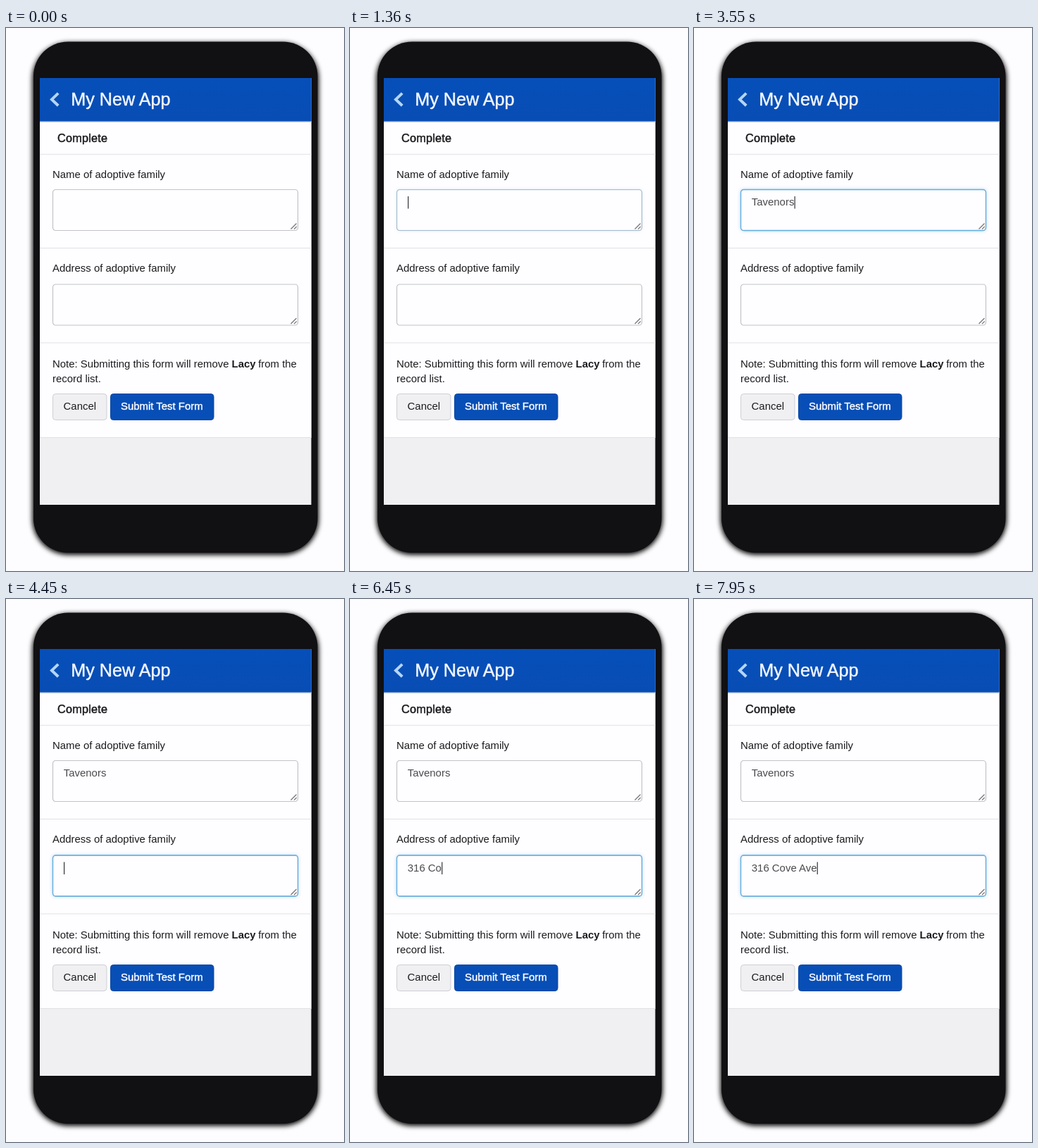
Animation, 480 px wide and 771 px high, one loop 8000 ms. Source, as an HTML page:

```html
<!DOCTYPE html>
<html lang="en">
<head>
<meta charset="utf-8">
<title>Adoption form</title>
<style>
html, body { margin: 0; width: 100%; height: 100%; overflow: hidden; background: #fdfcfe; }
svg { display: block; width: 100%; height: 100%; }
text { font: 14.93px "Liberation Sans", Arial, sans-serif; fill: #1c1c1e; white-space: pre; }
.title { font-size: 25.2px; fill: #f4f8ff; stroke: #f4f8ff; stroke-width: .45; }
.heading { font-size: 16.2px; letter-spacing: .25px; stroke: #1c1c1e; stroke-width: .5; }
.bold { font-weight: bold; }
.submit { fill: #fff; stroke: #fff; stroke-width: .4; }
.value { fill: #4b4b4e; }
.rule { stroke: #e1e1e5; }
.edge { fill: #fefdff; stroke: #c3c3c8; stroke-width: 1.2; }
.ring { fill: none; stroke: #62aee0; stroke-width: 1.3; }
.glow { fill: #66afe9; filter: url(#soft); }
.grip { fill: none; stroke: #6f6f73; stroke-width: 1.1; }
.caret { fill: #333336; }
</style>
</head>
<body>
<svg viewBox="0 0 480 771" preserveAspectRatio="none">
  <defs>
    <filter id="shade" x="-10%" y="-10%" width="120%" height="120%"><feGaussianBlur stdDeviation="3.6"/></filter>
    <filter id="soft" x="-5%" y="-25%" width="110%" height="150%"><feGaussianBlur stdDeviation="2.6"/></filter>
    <linearGradient id="bar" x1="0" y1="0" x2="0" y2="1">
      <stop offset="0" stop-color="#064fb9"/><stop offset="1" stop-color="#084db4"/>
    </linearGradient>
  </defs>

  <rect width="480" height="771" fill="#fdfcfe"/>
  <rect x="37.5" y="21" width="406.5" height="727" rx="51" fill="#000" filter="url(#shade)"/>
  <rect x="39" y="19.5" width="403.5" height="725.5" rx="49" fill="#111013"/>

  <rect x="48" y="71" width="385.5" height="606" fill="#f0eff2"/>
  <rect x="48" y="132" width="385.5" height="449.5" fill="#fefdff"/>
  <rect x="48" y="132" width="385.5" height="2" fill="#c9d2e4"/>
  <rect x="48" y="71" width="385.5" height="61.5" fill="url(#bar)"/>
  <path d="M74.2 92.6 65 101.4 74.2 110.2" fill="none" stroke="#b4d5f6" stroke-width="4"/>
  <text class="title" x="92.2" y="110.3">My New App</text>
  <text class="heading" x="73" y="161.5">Complete</text>
  <path class="rule" d="M48 179.3H433.5M48 312.5H433.5M48 447H433.5M48 581.5H433.5"/>

  <text x="66" y="213">Name of adoptive family</text>
  <text x="66" y="346.3">Address of adoptive family</text>
  <g id="fields"></g>

  <text x="66" y="482.3">Note: Submitting this form will remove</text>
  <text class="bold" x="320.6" y="482.3">Lacy</text>
  <text x="358.2" y="482.3">from the</text>
  <text x="66" y="503">record list.</text>
  <rect x="66.5" y="519.5" width="76.5" height="37" rx="4" fill="#f0eff2" stroke="#cfcfd3"/>
  <text x="81.6" y="542.3">Cancel</text>
  <rect x="148.5" y="519.5" width="146.5" height="37" rx="4" fill="#074eb6" stroke="#0646a5"/>
  <text class="submit" x="163" y="542.3">Submit Test Form</text>
</svg>
<script>
const LOOP = 8000, FADE = 150, BLINK = 500;
const NS = "http://www.w3.org/2000/svg";
const host = document.getElementById("fields");

function add(parent, name, attrs) {
  const el = document.createElementNS(NS, name);
  for (const key in attrs) el.setAttribute(key, attrs[key]);
  return parent.appendChild(el);
}

// keys: the time at which each letter appears
function makeField(y, value, focus, blur, keys) {
  const g = add(host, "g", { transform: `translate(66.5 ${y})` });
  const box = { width: 348, height: 58, rx: 4 };
  const glow = add(g, "rect", { ...box, class: "glow" });
  add(g, "rect", { ...box, class: "edge" });
  const ring = add(g, "rect", { ...box, class: "ring" });
  add(g, "path", { class: "grip", d: "M338 56 346 48M342.5 56.2 346.2 52.5" });
  const text = add(g, "text", { class: "value", x: 15.3, y: 22.6 });
  const caret = add(g, "rect", { class: "caret", y: 9.5, width: 1.2, height: 17.5 });
  return { value, focus, blur, keys, glow, ring, text, caret };
}

const fields = [
  makeField(229.5, "Tavenors", 1320, 4200,
    [1960, 2140, 2390, 2570, 2740, 2890, 3090, 3290]),
  makeField(364, "316 Cove Ave", 4200, LOOP + FADE,
    [4950, 5150, 5350, 5650, 6050, 6320, 6600, 6780, 7000, 7300, 7550, 7800])
];

const ramp = x => Math.max(0, Math.min(1, x / FADE));

function drawField(f, t) {
  const typed = f.keys.filter(k => k <= t).length;
  const shown = f.value.slice(0, typed);
  if (f.text.textContent !== shown) f.text.textContent = shown;

  const level = ramp(t - f.focus) - ramp(t - f.blur);
  f.ring.setAttribute("opacity", level);
  f.glow.setAttribute("opacity", level * 0.6);

  // the caret stays lit for a moment after every key
  const last = typed ? f.keys[typed - 1] : f.focus;
  const lit = t >= f.focus && t < f.blur && Math.floor((t - last) / BLINK) % 2 === 0;
  f.caret.setAttribute("opacity", lit ? 1 : 0);
  const width = typed ? f.text.getComputedTextLength() : 0;
  f.caret.setAttribute("x", 15.5 + width);
}

const start = performance.now();
function draw() {
  const t = (performance.now() - start) % LOOP;
  for (const f of fields) drawField(f, t);
  requestAnimationFrame(draw);
}
draw();
</script>
</body>
</html>
```
